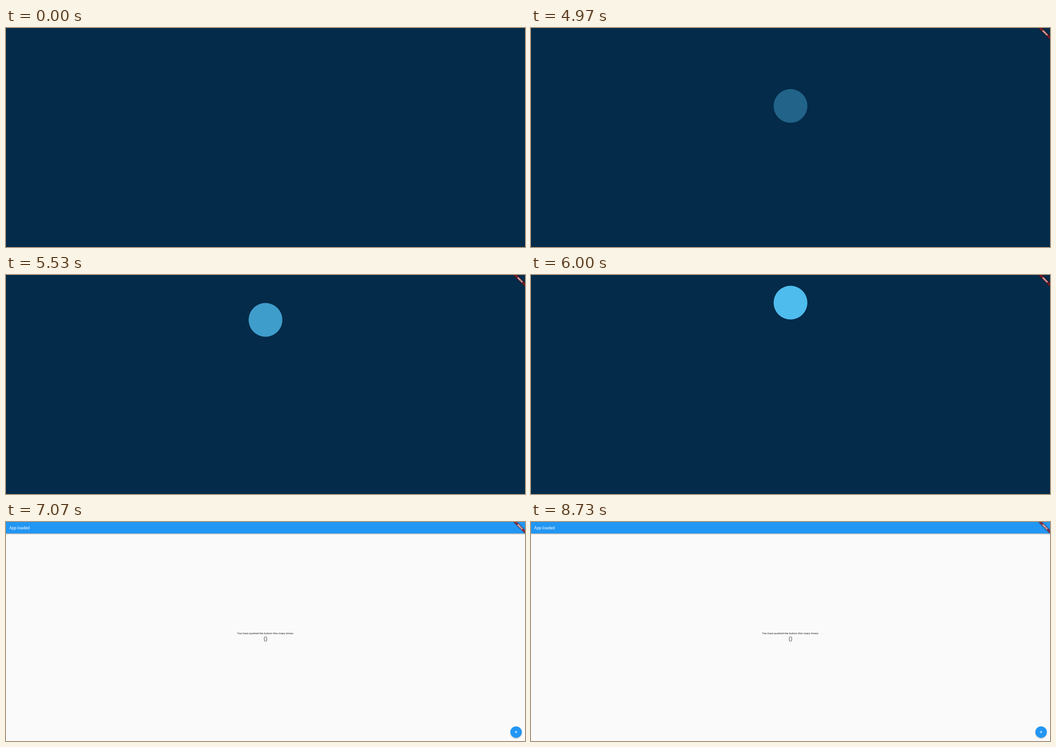
An HTML page that plays this animation: 1136x480 px, repeating every 8.79 s.

```html
<!DOCTYPE html>
<html lang="en">
<head>
<meta charset="utf-8">
<title>App loading</title>
<style>
  html, body { margin: 0; width: 100%; height: 100%; overflow: hidden; background: #042b49; }
  svg { display: block; width: 100%; height: 100%; }
  text { font-family: Roboto, "Open Sans", sans-serif; }
</style>
</head>
<body>
<svg viewBox="0 0 1136 480" xmlns="http://www.w3.org/2000/svg">
  <defs>
    <filter id="shade" x="-30%" y="-30%" width="160%" height="170%">
      <feDropShadow dx="0" dy="1.3" stdDeviation="1.2" flood-color="#000" flood-opacity=".34"/>
    </filter>
    <filter id="blur" x="-20%" y="-100%" width="140%" height="300%">
      <feGaussianBlur stdDeviation="1.3"/>
    </filter>
    <linearGradient id="edge" x1="0" y1="0" x2="0" y2="1">
      <stop offset="0" stop-color="#000" stop-opacity=".32"/>
      <stop offset="1" stop-color="#000" stop-opacity="0"/>
    </linearGradient>
  </defs>

  <g id="splash">
    <rect width="1136" height="480" fill="#042b49"/>
    <circle id="mark" cx="568" r="37" fill="#54c5f8"/>
  </g>

  <g id="app">
    <rect width="1136" height="480" fill="#fafafa"/>
    <rect y="25" width="1136" height="3" fill="url(#edge)"/>
    <rect width="1136" height="25" fill="#2196f3"/>
    <text x="7.1" y="16" font-size="8.92" fill="#fff">App loaded</text>
    <g text-anchor="middle" fill="#000">
      <text x="568" y="245.8" font-size="6.24" fill-opacity=".87">You have pushed the button this many times:</text>
      <text x="568" y="261.7" font-size="15.2" fill-opacity=".54">0</text>
    </g>
    <circle cx="1116.5" cy="460.4" r="12.5" fill="#2196f3" filter="url(#shade)"/>
    <path d="M1113.4 460.4h6.2M1116.5 457.3v6.2" stroke="#fff" stroke-width=".95"/>
  </g>

  <g id="banner" transform="translate(1136 0) rotate(45)">
    <rect x="-18" y="12.5" width="36" height="5.4" fill-opacity=".5" filter="url(#blur)"/>
    <rect x="-18" y="12.5" width="36" height="5.4" fill="#b71c1c" fill-opacity=".63"/>
    <text y="16.8" font-size="4.55" font-weight="900" fill="#fff" text-anchor="middle">DEBUG</text>
  </g>
</svg>
<script>
  const LOOP = 8790;
  const READY = 4470;    // banner appears
  const LOADED = 7070;   // hard cut to the app
  const RISE = { start: 4526, length: 1876, from: 240, to: 50 };

  const [splash, mark, app, banner] =
    ["splash", "mark", "app", "banner"].map(id => document.getElementById(id));

  const show = (node, on) => node.setAttribute("display", on ? "inline" : "none");
  const clamp = v => Math.min(1, Math.max(0, v));
  const easeOutSine = v => Math.sin(v * Math.PI / 2);

  function draw(t) {
    const p = easeOutSine(clamp((t - RISE.start) / RISE.length));
    show(splash, t < LOADED);
    show(app, t >= LOADED);
    show(banner, t >= READY);
    mark.setAttribute("cy", RISE.from + (RISE.to - RISE.from) * p);
    mark.setAttribute("opacity", p);
  }

  const origin = performance.now();
  function tick() {
    draw((performance.now() - origin) % LOOP);
    requestAnimationFrame(tick);
  }
  tick();
</script>
</body>
</html>
```
